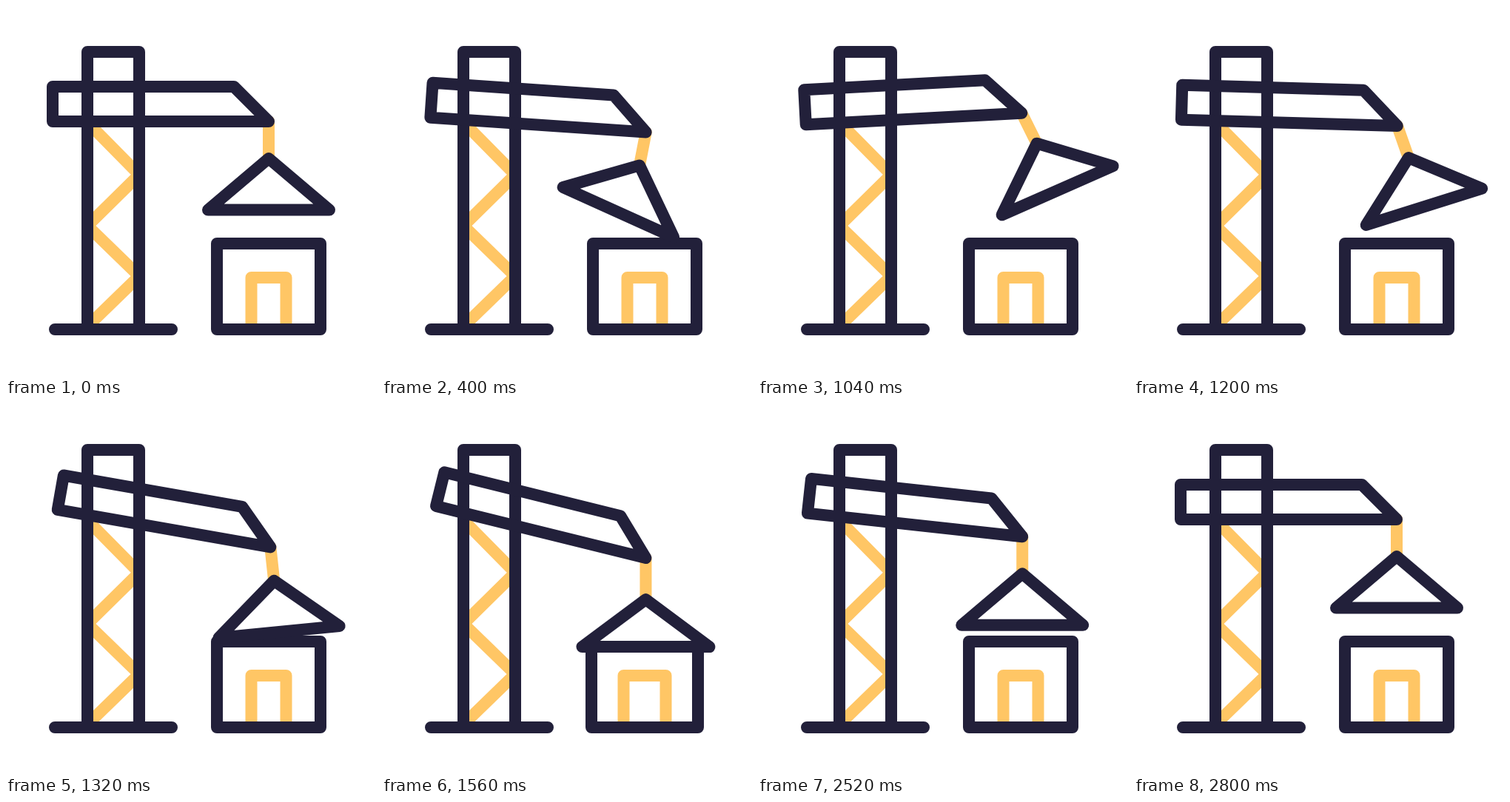
Write an HTML page that moves like this. It is 500x500 px and loops after 3000 ms.

```html
<!DOCTYPE html>
<html lang="en">
<head>
<meta charset="utf-8">
<title>Crane building a house</title>
<style>
  html, body { margin: 0; width: 100%; height: 100%; overflow: hidden; background: #fff; }
  svg { display: block; width: 100%; height: 100%; }
  path { fill: none; stroke: #22203a; stroke-width: 16; stroke-linecap: round; stroke-linejoin: round; }
  .gold { stroke: #ffc665; }
</style>
</head>
<body>
<svg viewBox="0 0 500 500">
  <path class="gold" d="M110 157L180 228L110 297L180 365L110 433"/>
  <path class="gold" id="door"/>
  <path class="gold" id="cable"/>
  <path d="M110 437V62H180V437M66 437H224"/>
  <path id="house"/>
  <path id="boom" d="M63 109H308L355 156H63Z"/>
  <path id="roof"/>
</svg>
<script>
const LOOP = 3000, PIVOT = [142, 188], ARM = [213, -32], MID = 355, GROUND = 437;

const rad = deg => deg * Math.PI / 180;
const set = (id, name, value) => document.getElementById(id).setAttribute(name, value);

// Smooth step from 0 to 1 between two times.
function ease(t, from, to) {
  const p = Math.min(1, Math.max(0, (t - from) / (to - from)));
  return p * p * (3 - 2 * p);
}

function draw(t) {
  const back = ease(t, 120, 400);
  const forth = ease(t, 400, 1080);
  const land = ease(t, 1080, 1430);
  const settle = ease(t, 1320, 1430);
  const squash = ease(t, 1440, 1560) - ease(t, 1560, 1720);
  const lift = ease(t, 2200, 2800);

  // Boom turns about its pivot and slides a little when tilted up.
  const tilt = 3.9 * back - 7 * forth + 17 * land - 13.9 * lift;
  const slide = Math.max(0, -tilt) * 1.1;
  const c = Math.cos(rad(tilt)), s = Math.sin(rad(tilt));
  const x = PIVOT[0] + ARM[0] * c - ARM[1] * s + slide;
  const y = PIVOT[1] + ARM[0] * s + ARM[1] * c;
  set('boom', 'transform', `translate(${slide}) rotate(${tilt} ${PIVOT})`);

  // Cable hangs from the tip of the boom.
  const swing = rad(11 * back - 37.8 * forth + 26.8 * land);
  const rope = 50 - 4.3 * (back - settle);
  const ax = x - rope * Math.sin(swing);
  const ay = y + rope * Math.cos(swing) + 6 * squash;
  set('cable', 'd', `M${x} ${y}L${ax} ${ay}`);

  const spin = 24.3 * back - 48.5 * forth + 24.2 * land;
  const half = 82 + 4 * squash, high = 69.5 - 5.5 * squash;
  set('roof', 'd', `M0 0L${half} ${high}H${-half}Z`);
  set('roof', 'transform', `translate(${ax} ${ay}) rotate(${spin})`);

  const top = 321 + 7 * (settle - ease(t, 2200, 2440));
  const wall = 70 + 2 * squash, jamb = 23.5 + 5 * squash;
  set('house', 'd', `M${MID - wall} ${GROUND}V${top}H${MID + wall}V${GROUND}Z`);
  set('door', 'd', `M${MID - jamb} ${GROUND}V367H${MID + jamb}V${GROUND}`);
}

function frame() {
  draw(performance.now() % LOOP);
  requestAnimationFrame(frame);
}
frame();
</script>
</body>
</html>
```
